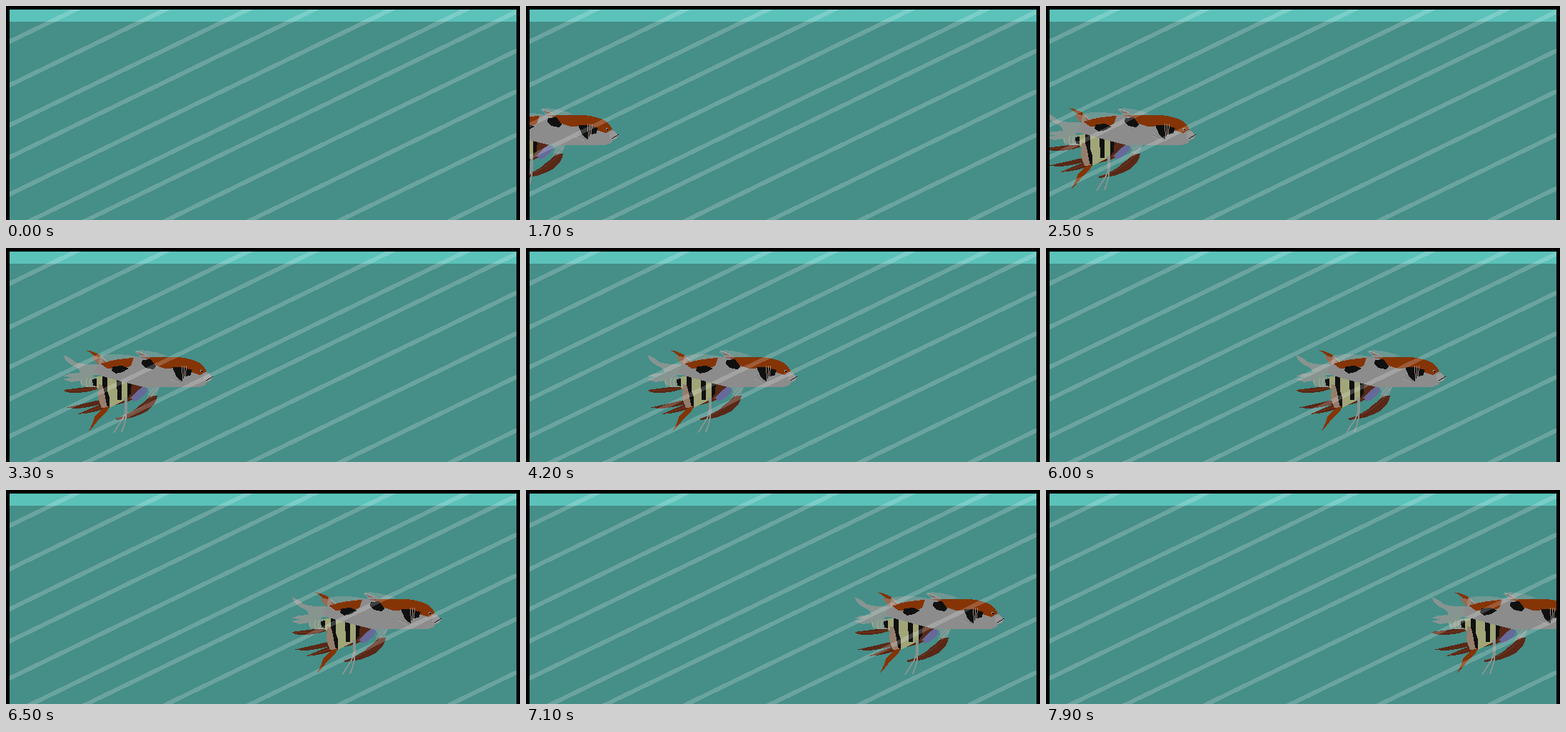
Write an HTML page that moves like this. It is 720 by 300 pixels and loops after 8 s.

```html
<!DOCTYPE html>
<html lang="en">
<head>
<meta charset="utf-8">
<title>Swimming koi</title>
<style>
  html, body { margin: 0; width: 100%; height: 100%; overflow: hidden; background: #000; }
  svg { display: block; width: 720px; height: 300px; shape-rendering: crispEdges; }
  .line { fill: none; stroke-width: 1; }
  .brown { fill: #592817; }
  .orange { fill: #853405; }
  .black { fill: #101010; }
  .grey { fill: #8c8c8c; }
  .veil { fill: #a0a4a2; fill-opacity: .45; }
</style>
</head>
<body>
<svg viewBox="0 0 720 300">
  <defs><clipPath id="tank"><rect x="5" y="5" width="710" height="295"/></clipPath></defs>
  <rect width="720" height="300"/>
  <g clip-path="url(#tank)">
    <rect x="5" y="5" width="710" height="17" fill="#5bc2ba"/>
    <rect x="5" y="22" width="710" height="278" fill="#468e88"/>
    <g id="fish">
      <!-- lower fins -->
      <g class="brown">
        <path d="M350 199Q373 196 390 194L403 195Q390 203 363 203Q354 203 350 199Z"/>
        <path d="M353 224Q380 218 405 212L428 211Q400 222 371 225Z"/>
        <path d="M370 233Q401 219 430 210L453 208Q446 216 423 220Q394 232 370 233Z"/>
        <path d="M424 239Q446 232 458 220Q469 212 471 207L482 207Q481 219 467 229Q448 240 424 241Z"/>
      </g>
      <path d="M424 239Q455 232 475 209" class="line" stroke="#6b3828"/>
      <path d="M351 200Q377 200 403 196M371 233L433 214" class="line" stroke="#743315"/>
      <path d="M465 194L486 194L480 207L467 211L471 202Z" class="veil"/>
      <path d="M484 195L472 209M479 195L469 205" class="line" stroke="#a09ea0"/>

      <!-- striped underside -->
      <path d="M372 183Q379 177 394 180L397 195L382 195Q374 192 372 183Z" fill="#83988a"/>
      <path d="M395 181L410 178L446 187L446 210L433 215L415 224L407 203L395 194Z" fill="#a1a578"/>
      <path d="M445 188L464 194L449 208L439 213Z" class="brown"/>
      <path d="M445 209L453 201L461 195L469 197L465 205L455 213L448 215Z" fill="#66699a"/>
      <path d="M400 191L406 193L413 223L404 224L399 211Z" fill="#967e6c"/>
      <g class="black">
        <path d="M391 184L397 183L397 194L392 193Z"/>
        <path d="M405 179L412 179L412 200L415 210L415 225L411 220L407 198L405 193Z"/>
        <path d="M425 182L432 183L432 213L426 213Z"/>
        <path d="M440 187L446 187L445 204L440 211Z"/>
      </g>
      <path d="M377 182Q373 190 379 195M384 182Q380 190 385 195M389 182Q386 189 389 195" class="line" stroke="#a0aca3"/>
      <path d="M415 222L407 224Q399 230 394 237Q391 248 386 256Q393 250 400 240L411 230Z" class="orange"/>
      <path d="M436 210Q440 230 432 242Q427 249 421 259M439 210Q441 237 432 258" fill="none" stroke="#879490" stroke-width="2"/>

      <!-- tail and body -->
      <path d="M382 143Q394 145 405 152L413 163L402 160Q393 149 382 143Z" class="orange"/>
      <path d="M390 152L406 153L405 165L397 162Z" fill="#966b53"/>
      <path d="M350 150Q360 153 367 160Q379 164 398 163L411 179Q397 176 386 180Q377 187 361 188L350 184L364 181L350 180L359 176L374 175Q373 168 362 164Q353 159 350 150Z" fill="#879591"/>
      <path d="M401 151Q425 146 458 153L440 162L400 163Z" class="veil"/>
      <path d="M400 162Q430 152 463 153L515 153Q535 157 545 165L551 174L560 181L557 186L551 188L550 192L540 195L463 195Q441 190 421 184L402 179L393 174Z" class="grey"/>
      <path d="M402 162Q425 155 449 154L445 165Q438 169 426 168L412 169Z" class="orange"/>
      <path d="M463 153L513 153Q530 155 541 161Q548 166 551 173L542 178L529 174L511 168L492 169L477 164L472 157Z" class="orange"/>
      <path d="M498 179L506 177L518 187L510 189L500 185Z" fill="#929292"/>
      <g class="black">
        <path d="M420 166L433 165L442 169L433 174L424 176L418 172Z"/>
        <path d="M461 157L473 156L480 166L476 170L465 168L460 162Z"/>
        <path d="M503 167L516 167L531 171L528 179L520 180L516 188L508 179Z"/>
      </g>

      <!-- dorsal fin, gill, face -->
      <path d="M449 145L459 143Q482 145 497 152L463 154Z" class="veil"/>
      <path d="M455 146L467 150L470 154L461 155Z" fill="#89716a"/>
      <path d="M452 144L467 150M456 151L470 152M402 151L412 160" class="line" stroke="#a3aaa6"/>
      <path d="M499 180L515 188M503 178L516 187" class="line" stroke="#777"/>
      <path d="M516 165L518 186M519 165L520 181M523 165L521 180" class="line" stroke="#96867c"/>
      <path d="M547 177L553 175L560 181L557 186L550 188L547 184Z" fill="#979797"/>
      <path d="M550 186L560 180" class="line" stroke="#111"/>
      <rect x="542" y="171" width="3" height="3" fill="#999"/>
      <rect x="543" y="172" width="2" height="2"/>
    </g>
    <g id="rays" stroke="#fff" stroke-opacity=".2" stroke-width="6"></g>
  </g>
</svg>
<script>
  const SLOPE = -0.485;
  const rayStarts = [50, 111, 167, 212, 264, 315, 352.5, 407, 464, 525, 600];
  const rays = document.getElementById('rays');
  for (const y of rayStarts) {
    const ray = document.createElementNS('http://www.w3.org/2000/svg', 'line');
    const ends = { x1: -5, y1: y - 10 * SLOPE, x2: 725, y2: y + 720 * SLOPE };
    for (const [name, value] of Object.entries(ends)) ray.setAttribute(name, value);
    rays.append(ray);
  }

  // Ten pixels every 100 ms
  document.getElementById('fish').animate(
    [{ transform: 'translateX(-600px)' }, { transform: 'translateX(200px)' }],
    { duration: 8000, iterations: Infinity, easing: 'steps(80, end)' }
  );
</script>
</body>
</html>
```
